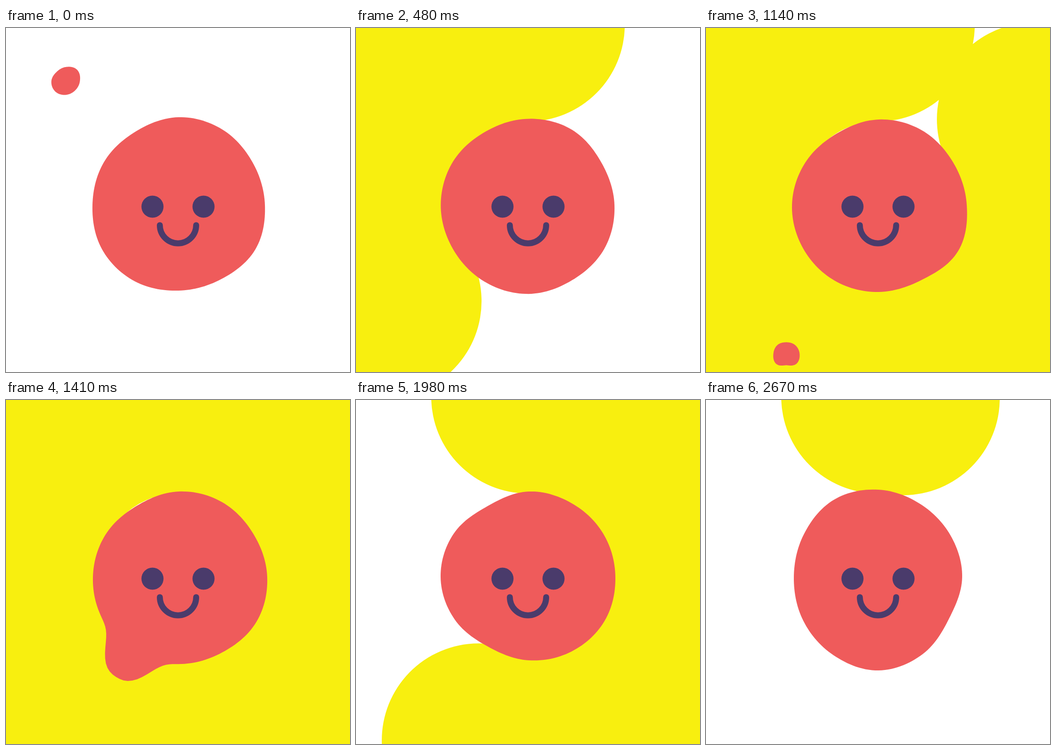
An HTML page with a canvas for the animation above (2.7 s loop, 748 by 748 pixels).

```html
<!DOCTYPE html>
<html lang="en">
<head>
<meta charset="utf-8">
<title>Blob</title>
<style>
  html, body { margin: 0; width: 100%; height: 100%; overflow: hidden; background: #fff; }
  canvas { display: block; width: 748px; height: 748px; }
</style>
</head>
<body>
<canvas id="stage" width="748" height="748"></canvas>
<script>
const ctx = document.getElementById('stage').getContext('2d');
const TAU = Math.PI * 2;
const RAD = Math.PI / 180;
const LOOP = 2700, STEP = 30;
const RED = '#ef5b5b', YELLOW = '#f8ef0f', NAVY = '#4a3b6b';
const BODY = { x: 375, y: 385 };

// Body radii every 30 degrees, clockwise from the right.
const POSES = [
  { at: 0,    r: [188, 193, 186, 186, 191, 192, 187, 187, 185, 191, 190, 186] },
  { at: 210,  r: [187, 189, 188, 189, 191, 189, 187, 187, 185, 189, 190, 184] },
  { at: 780,  r: [187, 192, 190, 198, 193, 191, 195, 192, 185, 186, 188, 183] },
  { at: 1140, r: [192, 200, 188, 189, 190, 189, 188, 184, 180, 186, 188, 187] },
  { at: 1680, r: [194, 191, 191, 189, 184, 188, 184, 183, 179, 186, 189, 189] },
  { at: 1980, r: [189, 191, 187, 181, 175, 185, 191, 188, 178, 186, 186, 188] },
  { at: 2670, r: [182, 178, 193, 203, 196, 189, 184, 187, 194, 190, 183, 181] }
];

// Drops fall toward the body along a fixed angle; radii every 45 degrees.
const DROPS = [
  { start: 0,    from: 0,   angle: 227.7, bump: 230.3, r: [31, 29, 30, 32, 31, 28, 30.5, 35] },
  { start: 1161, from: -25, angle: 121.8, bump: 121.8, r: [29, 31, 25, 31, 28, 27, 25, 27] }
];

const clamp = v => Math.min(1, Math.max(0, v));
const smooth = v => { v = clamp(v); return v * v * (3 - 2 * v); };
const mix = (a, b, k) => a + (b - a) * k;

// Periodic cubic through evenly spaced radii.
function radiusAt(radii, degrees) {
  const n = radii.length;
  const pos = degrees / 360 * n;
  const i = Math.floor(pos), f = pos - i;
  const [a, b, c, d] = [-1, 0, 1, 2].map(k => radii[(i + k + n) % n]);
  return b + f * (c - a + f * (2 * a - 5 * b + 4 * c - d + f * (3 * (b - c) + d - a))) / 2;
}

function fillPolar(x, y, radius) {
  ctx.beginPath();
  for (let a = 0; a < 360; a += 2) {
    const r = radius(a);
    ctx.lineTo(x + r * Math.cos(a * RAD), y + r * Math.sin(a * RAD));
  }
  ctx.fill();
}

function disc(x, y, r) {
  ctx.beginPath();
  ctx.arc(x, y, r, 0, TAU);
  ctx.fill();
}

function drawRing(t) {
  const head = clamp(t / 1380) * TAU;
  const tail = clamp((t - 1380) / 1320) * TAU;
  if (head <= tail) return;
  ctx.strokeStyle = YELLOW;
  ctx.lineWidth = 421;
  ctx.lineCap = 'round';
  ctx.beginPath();
  ctx.arc(374, 374, 381.3, -Math.PI / 2 - tail, -Math.PI / 2 - head, true);
  ctx.stroke();
}

function poseAt(t) {
  const next = POSES.findIndex(p => p.at > t);
  if (next < 0) return POSES[POSES.length - 1].r;
  const a = POSES[next - 1], b = POSES[next];
  const k = smooth((t - a.at) / (b.at - a.at));
  return a.r.map((r, i) => mix(r, b.r[i], k));
}

function bumpHeight(u) {
  return 76 * (u < 210 ? smooth((u - 100) / 110) : 1 - smooth((u - 210) / 210));
}

function bumpAt(drop, height, a) {
  const gap = Math.abs((a - drop.bump + 540) % 360 - 180);
  return height * Math.exp(-Math.pow(gap / 16, 2.6));
}

function drawBody(t) {
  ctx.fillStyle = RED;
  const pose = poseAt(t);
  const heights = DROPS.map(d => bumpHeight(t - d.start));
  fillPolar(BODY.x, BODY.y, a =>
    DROPS.reduce((r, d, i) => r + bumpAt(d, heights[i], a), radiusAt(pose, a)));

  for (const d of DROPS) {
    const u = t - d.start;
    if (u < d.from || u > 210) continue;
    const dist = 364.5 - 0.76 * u;
    const size = 1 + 0.0029 * Math.max(0, u);
    const round = smooth(u / 150);
    fillPolar(BODY.x + dist * Math.cos(d.angle * RAD), BODY.y + dist * Math.sin(d.angle * RAD),
      a => size * mix(radiusAt(d.r, a), 30.5, round));
  }
}

function drawFace() {
  ctx.fillStyle = ctx.strokeStyle = NAVY;
  disc(318.5, 388.5, 24);
  disc(429.5, 388.5, 24);
  ctx.lineWidth = 13;
  ctx.lineCap = 'round';
  ctx.beginPath();
  ctx.arc(374, 428.7, 39.5, 0, Math.PI);
  ctx.stroke();
}

let origin = null;
function draw(now) {
  if (origin === null) origin = now;
  const t = Math.floor((now - origin) % LOOP / STEP) * STEP;
  ctx.fillStyle = '#fff';
  ctx.fillRect(0, 0, 748, 748);
  drawRing(t);
  drawBody(t);
  drawFace();
  requestAnimationFrame(draw);
}
requestAnimationFrame(draw);
</script>
</body>
</html>
```
